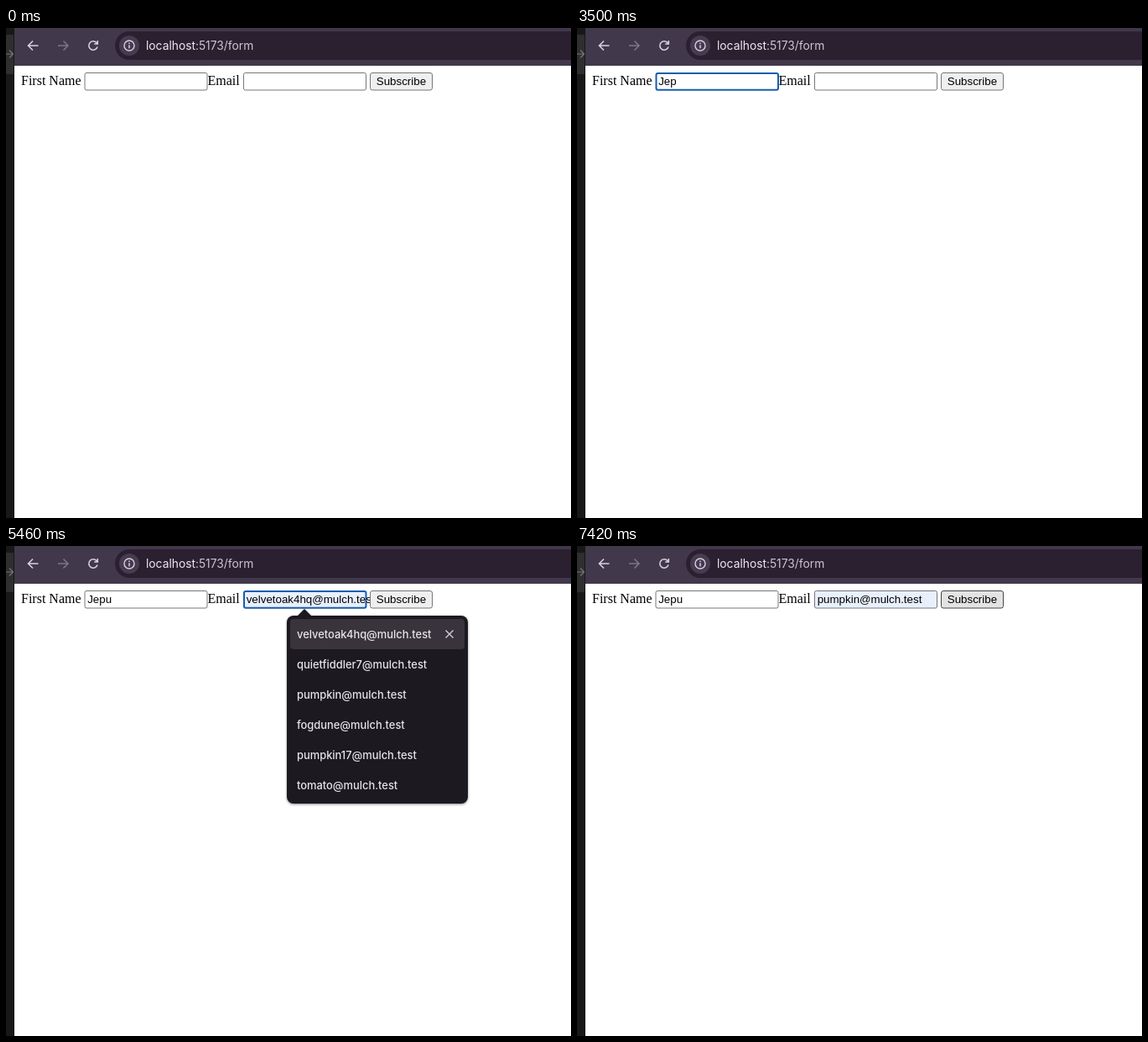
These frames come from a looping animation (674x584 px, 8 s). An HTML page:

```html
<!DOCTYPE html>
<html lang="en">
<head>
<meta charset="utf-8">
<title>Form</title>
<style>
  html, body { margin: 0; width: 100%; height: 100%; overflow: hidden; background: #fff; }
  svg { display: block; width: 674px; height: 584px; }
  text { white-space: pre; }
  .label { font: 16px "Liberation Serif", serif; }
  .field { font: 13.333px "Liberation Sans", sans-serif; }
  .option { font: 500 12.9px Inter, sans-serif; fill: #e8e3ea; }
  .url { font: 13.8px Inter, sans-serif; fill: #cdc4d3; }
  .popup { filter: drop-shadow(0 1px 1.5px rgba(0, 0, 0, .45)); }
  .icon { fill: none; stroke: #d9d0e0; stroke-width: 1.6; }
</style>
</head>
<body>
<svg viewBox="0 0 674 584">
  <rect width="10" height="584" fill="#181818"/>
  <rect y="8" width="9" height="47" fill="#2f2f2f"/>
  <path d="M0 31H8M4 26.500L8.500 31L4 35.500" class="icon" style="stroke:#777;stroke-width:1.2"/>
  <rect x="10" width="664" height="45" fill="#41384b"/>
  <rect x="130" y="4" width="600" height="34" rx="17" fill="#2b2030"/>
  <circle cx="147" cy="21" r="12" fill="#463b50"/>
  <g class="icon">
    <path d="M38.500 21H27M32 15.500L26.500 21L32 26.500"/>
    <path d="M62 21H73.500M68.500 15.500L74 21L68.500 26.500" stroke="#7d7487"/>
    <path d="M108.300 18A5.200 5.200 0 1 0 109 22.500M109.300 15V19H105.200"/>
    <circle cx="147" cy="21" r="6" stroke-width="1.400"/>
    <path d="M147 20.300V24.300M147 17.500V19" stroke-width="1.500"/>
  </g>
  <text x="167" y="26" class="url"><tspan fill="#eee8f2">localhost</tspan>:5173/form</text>
  <text x="18" y="68" class="label">First Name</text>
  <text x="240.500" y="68" class="label">Email</text>
  <g id="form"></g>
</svg>
<script>
const LOOP = 8000;
const FIRST_NAME = "Jepu";
const EMAILS = ["velvetoak4hq", "quietfiddler7", "pumpkin", "fogdune", "pumpkin17", "tomato"]
  .map(user => user + "@mulch.test");
const NAME_X = 93.5, EMAIL_X = 283;

const form = document.getElementById("form");
const pen = document.createElement("canvas").getContext("2d");
pen.font = '13.333px "Liberation Sans", sans-serif';

const within = (t, ...spans) => spans.some(([from, to]) => t >= from && t < to);
const passed = (t, times) => times.filter(time => t >= time).length;

function input(x, { value, focused, hovered, caret, caretAtStart, filled }) {
  const fill = filled ? "#e8f0fe" : "#fff";
  const textX = x + 3.7;
  const caretX = textX + (caretAtStart ? 0 : pen.measureText(value).width);
  const box = focused
    ? `<rect x="${x - .5}" y="52.500" width="148" height="23" rx="3" fill="#fff"/>
       <rect x="${x + 1}" y="54" width="145.500" height="19.800" rx="2" fill="${fill}" stroke="#175cad" stroke-width="2"/>`
    : `<rect x="${x + .5}" y="53.500" width="146" height="20.500" rx="2" fill="${fill}" stroke="${hovered ? "#4f4f4f" : "#767676"}"/>`;
  return box + `<text x="${textX}" y="68" class="field">${value}</text>` +
    (caret ? `<rect x="${caretX}" y="56" width="1" height="15.500"/>` : "");
}

function popup(x, width, options, selected) {
  const tip = x + 21;
  const rows = options.map((option, i) => {
    const top = 87 + i * 36, cross = x + width - 22, mid = top + 18;
    const highlight = i === selected
      ? `<rect x="${x + 4}" y="${top}" width="${width - 8}" height="36" rx="4" fill="#39343c"/>
         <path d="M${cross - 4.5} ${mid - 4.5}l9 9m0 -9l-9 9" class="icon" style="stroke-width:1.3"/>`
      : "";
    return highlight + `<text x="${x + 12}" y="${top + 22.7}" class="option">${option}</text>`;
  });
  return `<g class="popup" fill="#1d1920">
    <path d="M${tip - 9} 84L${tip} 75L${tip + 9} 84Z"/>
    <rect x="${x}" y="83" width="${width}" height="${options.length * 36 + 8}" rx="8"/></g>${rows.join("")}`;
}

function button(hovered, pressed) {
  const fill = pressed ? "#f5f5f5" : hovered ? "#e3e3e3" : "#efefef";
  const stroke = pressed ? "#8d8d8d" : hovered ? "#454545" : "#767676";
  return `<rect x="434.500" y="53.500" width="74" height="20.500" rx="2.500" fill="${fill}" stroke="${stroke}"/>
    <text x="441.800" y="68" class="field">Subscribe</text>`;
}

function view(t) {
  const selected = passed(t, [5460, 5530, 5600]) - 1;
  const name = input(NAME_X, {
    value: FIRST_NAME.slice(0, passed(t, [1330, 1960, 3010, 4200])),
    focused: within(t, [140, 4690]),
    hovered: within(t, [70, 140]),
    caret: within(t, [140, 630], [1330, 2310], [2870, 3500], [4060, 4690]),
  });
  const email = input(EMAIL_X, {
    value: selected < 0 ? "" : EMAILS[selected],
    focused: within(t, [4690, 7280]),
    hovered: within(t, [4410, 4690]),
    caret: within(t, [4690, 5250], [5810, 6580], [7070, 7280]),
    caretAtStart: t < 6020,
    filled: selected >= 0,
  });
  return name + email + button(t >= 6860, within(t, [7280, 7420])) +
    (within(t, [490, 1470]) ? popup(146, 156, [FIRST_NAME], -1) : "") +
    (within(t, [4830, 6020]) ? popup(335, 216, EMAILS, selected) : "");
}

let shown = "";
const start = performance.now();
function draw() {
  const markup = view((performance.now() - start) % LOOP);
  if (markup !== shown) form.innerHTML = shown = markup;
  requestAnimationFrame(draw);
}
draw();
</script>
</body>
</html>
```
